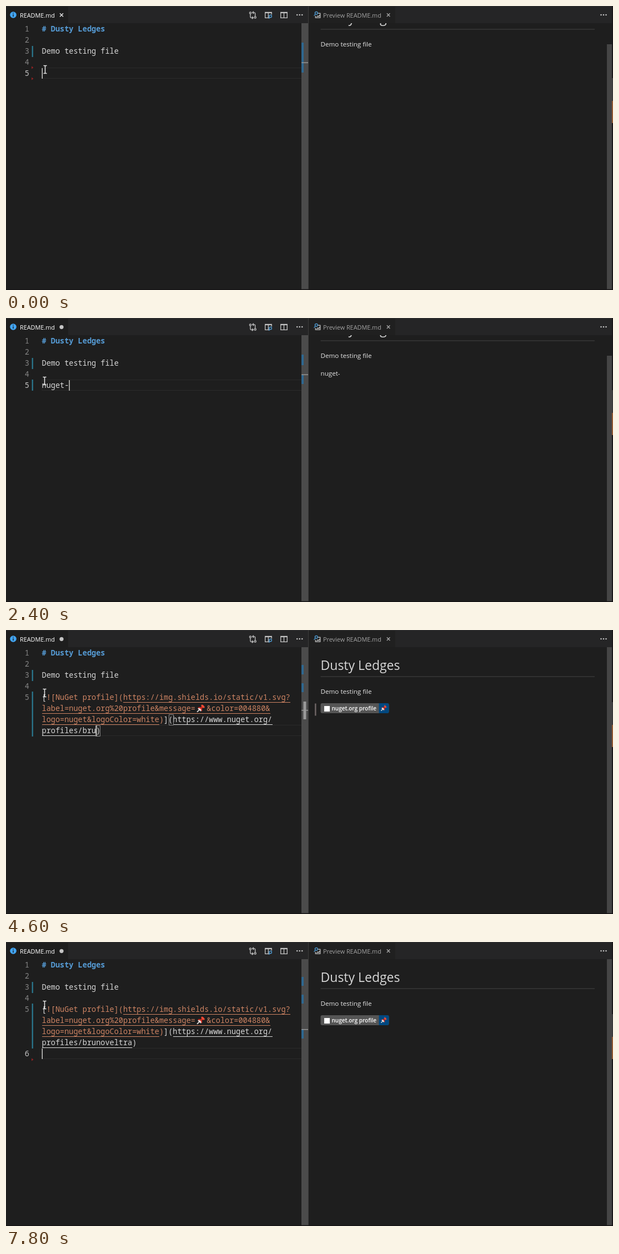
Animation, 1093 px wide and 512 px high, one loop 8000 ms. Source, as an HTML page:

```html
<!DOCTYPE html>
<html lang="en">
<head>
<meta charset="utf-8">
<title>Markdown editor with preview</title>
<style>
  html, body { margin: 0; width: 100%; height: 100%; overflow: hidden; background: #1e1e1e; }
  svg { display: block; width: 1093px; height: 512px; }
  text { white-space: pre; }
  .code { font: 13.56px "Noto Sans Mono", "DejaVu Sans Mono", monospace; fill: #d8d8d8; }
  .num { fill: #858585; text-anchor: end; }
  .on { fill: #c6c6c6; }
  .str { fill: #ce8463; }
  .head { font-weight: 700; fill: #569cd6; }
  .ui { font: 10.85px "Open Sans", "Noto Sans", sans-serif; }
  .body { font: 11.65px "Open Sans", "Noto Sans", sans-serif; fill: #e6e6e6; }
  .title { font: 23px "Open Sans", "Noto Sans", sans-serif; fill: #d8d8d8; }
  .label { font: 600 10px "Open Sans", "Noto Sans", sans-serif; fill: #fff; }
  .icon { fill: none; stroke: #c5c5c5; stroke-width: 1.3; }
  .blue { stroke: #4f9fd8; }
</style>
</head>
<body>
<svg viewBox="0 0 1093 512">
  <defs>
    <clipPath id="pane"><rect x="546" y="31" width="536" height="480"/></clipPath>
    <symbol id="pin" viewBox="0 0 14 14">
      <path d="M1 13L5.5 8.5" stroke="#d8d8d8" stroke-width="1.8"/>
      <path d="M2.2 5.2Q5 3.6 7 5L10 2.5L12 4.5L9.2 7.2Q10.6 9.4 9 12Z" fill="#c92a20"/>
      <path d="M2 7.2Q4 5 7 7.6Q9 10 7.2 12Z" fill="#f2e4e0"/>
      <ellipse cx="10.8" cy="3.4" rx="1.9" ry="3.5" transform="rotate(-45 10.8 3.4)" fill="#ef4a35"/>
    </symbol>
    <g id="dots" fill="#c5c5c5">
      <circle cx="-4.5" r="1.3"/><circle r="1.3"/><circle cx="4.5" r="1.3"/>
    </g>
  </defs>

  <!-- window frame -->
  <rect width="1093" height="512" fill="#1e1e1e"/>
  <rect width="1093" height="31" fill="#252526"/>
  <rect width="112" height="31" fill="#1e1e1e"/>
  <rect x="545" width="156" height="31" fill="#202020"/>
  <rect width="1093" height="1" fill="#303031"/>

  <!-- editor tab and tools -->
  <circle cx="13" cy="16" r="5.8" fill="#42a5f5"/>
  <path d="M13 15v4.2M13 12.2v1.5" stroke="#1e1e1e" stroke-width="1.4"/>
  <text class="ui" x="25" y="20.5" fill="#fff">README.md</text>
  <path id="close" d="M97 13.2l6 6m0-6l-6 6" stroke="#e0e0e0" stroke-width="1.6"/>
  <circle id="dirty" cx="100" cy="16.3" r="3.6" fill="#c5c5c5"/>
  <g class="icon">
    <circle cx="440" cy="12.5" r="1.6"/><circle cx="448.7" cy="20.5" r="1.6"/>
    <path d="M440 14.2v5.3q0 1.8 2 1.8h2.5M443 19l2.2 2.2L443 23.4M448.7 18.8v-5.2q0-1.8-2-1.8h-2.2M446 9.6l-2.2 2.2L446 14"/>
    <path d="M475 21.4h-8.3V11.4h11.6v4M467 12.4h11M472.4 12v9.4"/>
    <path class="blue" d="M473.2 22.6l2-2"/><circle class="blue" cx="476.2" cy="18.4" r="2.2"/>
    <path d="M494.7 11.4h11.6v10h-11.6zM495 12.4h11M500.5 12v9.4"/>
  </g>
  <use href="#dots" x="528.7" y="16"/>

  <!-- preview tab -->
  <g class="icon">
    <path d="M561.5 13.2h4.2v8h-8.4v-3.5M559.5 19.8l2-2 1.5 1.3 2-2.6"/>
    <circle class="blue" cx="558.8" cy="12.8" r="2.4"/><path class="blue" d="M557 14.7l-2.4 3"/>
  </g>
  <text class="ui" x="571" y="20.5" fill="#a2a2a2">Preview README.md</text>
  <path d="M685.8 13.3l5.6 5.6m0-5.6l-5.6 5.6" stroke="#a5a5a5" stroke-width="1.4"/>
  <use href="#dots" x="1076" y="16"/>

  <!-- editor -->
  <rect id="row" x="65" width="478" height="19" fill="none" stroke="#2a2a2a"/>
  <g id="numbers" class="code"></g>
  <rect x="46.6" y="72" width="2.2" height="20" fill="#2b7a92"/>
  <rect id="added" x="46.6" y="111" width="2.2" fill="#2b7a92"/>
  <path id="cut" fill="#8f2222"/>
  <g class="code">
    <text class="head" x="64.6" y="46"># Dusty Ledges</text>
    <text x="64.6" y="86">Demo testing file</text>
    <text id="word" x="64.6" y="126"></text>
  </g>
  <g id="snip" class="code">
    <text x="64.6" y="126">[<tspan class="str">![NuGet profile](https://img.shields.io/static/v1.svg?</tspan></text>
    <text class="str" x="64.6" y="146">label=nuget.org%20profile&amp;message=</text>
    <use href="#pin" x="343" y="134" width="15" height="15"/>
    <text class="str" x="361.6" y="146">&amp;color=004880&amp;</text>
    <text x="64.6" y="166"><tspan class="str">logo=nuget&amp;logoColor=white)</tspan>](https://www.nuget.org/</text>
    <text id="path" x="64.6" y="186"></text>
    <path d="M301 170.5H480" stroke="#d8d8d8"/>
    <path id="line" stroke="#d8d8d8"/>
    <path id="link" d="M211 130.5H512M65 150.5H476M65 170.5H276" stroke="#ce8463"/>
  </g>
  <path id="pair" fill="none" stroke="#888"/>
  <rect id="caret" width="1.4" height="19" fill="#d8d8d4"/>

  <!-- overview ruler -->
  <rect x="532" y="31" width="12" height="481" fill="#4b4b4b"/>
  <path id="marks" stroke="#2f678f" stroke-width="4"/>
  <rect id="pairMark" x="535.5" y="129" width="5" height="32" fill="#999"/>
  <rect id="here" x="532" width="12" height="1.4" fill="#9b9b9b"/>
  <rect x="544" width="1" height="512" fill="#3c3c3c"/>

  <!-- preview -->
  <g clip-path="url(#pane)">
    <g id="page">
      <text class="title" x="566.5" y="72">Dusty Ledges</text>
      <rect x="566.5" y="83.5" width="493.5" height="1" fill="#454545"/>
      <text class="body" x="566.5" y="115">Demo testing file</text>
      <text id="echo" class="body" x="566.5" y="147"></text>
      <rect id="active" x="556" y="132.5" width="2.6" height="22" fill="#6a6262"/>
      <g id="badge">
        <rect x="566.5" y="132" width="123" height="18" rx="3" fill="#555"/>
        <path d="M671.5 132h15q3 0 3 3v12q0 3-3 3h-15z" fill="#004880"/>
        <rect x="573" y="137" width="10" height="10" fill="#fff"/>
        <text class="label" x="586.5" y="145">nuget.org profile</text>
        <use href="#pin" x="674.5" y="135.5" width="11" height="11"/>
      </g>
    </g>
  </g>
  <rect id="thumb" x="1082" width="9" fill="#454545"/>
  <rect x="1091" width="2" height="512" fill="#1a1718"/>
  <rect x="1091" y="130" width="2" height="41" fill="#3c3c3c"/>
  <rect x="1091" y="171" width="2" height="40" fill="#935c34"/>
  <rect y="510.5" width="1093" height="1.5" fill="#171516"/>

  <!-- mouse pointer -->
  <path id="mouse" d="M-3 -6.5H-1Q0 -6.5 0 -5.5Q0 -6.5 1 -6.5H3M0 -5.5V6.5M-3 7.5H-1Q0 7.5 0 6.5Q0 7.5 1 7.5H3" fill="none" stroke="#e8e8e8" stroke-width="1.5"/>
</svg>
<script>
const LOOP = 8000, LEFT = 64.6, CHAR = 8.136;
const OLD = 'newtonsoft', USER = 'brunoveltra';
const el = Object.fromEntries([...document.querySelectorAll('[id]')].map(e => [e.id, e]));
const col = n => LEFT + n * CHAR;
const show = (e, on) => e.setAttribute('visibility', on ? 'inherit' : 'hidden');
const set = (e, attrs) => { for (const k in attrs) e.setAttribute(k, attrs[k]); };

for (let n = 1; n <= 6; n++) {
  const t = document.createElementNS('http://www.w3.org/2000/svg', 'text');
  set(t, { x: 42, y: n < 6 ? 26 + 20 * n : 206 });
  t.textContent = n;
  el.numbers.append(t);
}

// Each entry changes part of the state from its time on; "after" counts characters past the user name.
const typed = (times, text, key, sizes) => times.map((t, i) => [t, { [key]: text.slice(0, sizes[i]) }]);
const events = [
  [0, { word: '', user: OLD, echo: '', scroll: 42, thumb: 69, after: 2 }],
  ...typed([400, 600, 1000, 1200, 1400, 1600], 'nuget-', 'word', [1, 2, 3, 4, 5, 6]),
  [1000, { echo: 'nug', scroll: 43, thumb: 68 }],
  [1800, { echo: 'nuget-' }],
  [2600, { snip: true, active: true }],
  [3000, { badge: true, echo: '', scroll: 0, thumb: 31 }],
  [3200, { after: 1 }],
  [3400, { after: 0 }],
  ...typed([3800, 4000, 4200], OLD, 'user', [6, 2, 0]),
  [4000, { link: true }],
  ...typed([4400, 4600, 4800, 5000, 5200, 5400, 5600], USER, 'user', [1, 3, 4, 6, 7, 9, 11]),
  [6000, { after: 1 }],
  [6200, { after: 2 }],
  [7200, { newline: true, active: false }],
];

function draw(t) {
  const s = Object.assign({}, ...events.filter(e => e[0] <= t).map(e => e[1]));
  const dirty = s.word !== '';
  const end = 9 + s.user.length;
  const row = s.newline ? 4 : s.snip ? 3 : 0;
  const at = s.newline ? 0 : s.snip ? end + s.after : s.word.length;
  const top = 111 + 20 * row;
  const pair = s.snip && s.after < 2;

  show(el.close, !dirty);
  show(el.dirty, dirty);
  set(el.row, { y: top + .5 });
  set(el.caret, { x: col(at), y: top + 1 });
  set(el.mouse, { transform: dirty ? 'translate(69.5 113)' : 'translate(70.5 114)' });

  // A number lights up only on the visual row that holds the caret.
  [...el.numbers.children].forEach((n, i) => {
    const lit = s.newline ? i === 5 : i === 4 && !s.snip;
    n.setAttribute('class', lit ? 'num on' : 'num');
    show(n, i < 5 || s.newline);
  });
  set(el.added, { height: s.snip ? 81 : dirty ? 20 : 0 });
  const wedge = y => `M46 ${y - 2.5}l3.5 2.5l-3.5 2.5z`;
  set(el.cut, { d: s.newline ? wedge(212) : dirty ? '' : wedge(111) + wedge(131) });

  el.word.textContent = s.snip ? '' : s.word;
  el.path.textContent = `profiles/${s.user})`;
  show(el.snip, s.snip);
  show(el.link, s.snip && s.link);
  set(el.line, { d: `M65 190.5H${col(end)}` });
  const box = (x, y) => `M${x} ${y}h8v19h-8z`;
  set(el.pair, { d: pair ? box(293.5, 152.5) + box(Math.round(col(end)) - .5, 172.5) : '' });

  const bar = (a, b) => `M534 ${a}V${b}`;
  set(el.marks, { d: s.newline ? bar(63, 79) + bar(95, 111) + bar(157, 174)
    : s.snip ? bar(63, 80) + bar(96, 112)
    : dirty ? bar(66, 85) + bar(102, 119) : bar(66, 120) });
  show(el.pairMark, pair);
  set(el.here, { y: s.newline ? 157 : s.snip ? 144 : 101.5 });

  set(el.page, { transform: `translate(0 ${-s.scroll})` });
  el.echo.textContent = s.echo;
  show(el.active, s.active);
  show(el.badge, s.badge);
  set(el.thumb, { y: s.thumb, height: 512 - s.thumb });
}

function tick() {
  draw(performance.now() % LOOP);
  requestAnimationFrame(tick);
}
tick();
</script>
</body>
</html>
```
